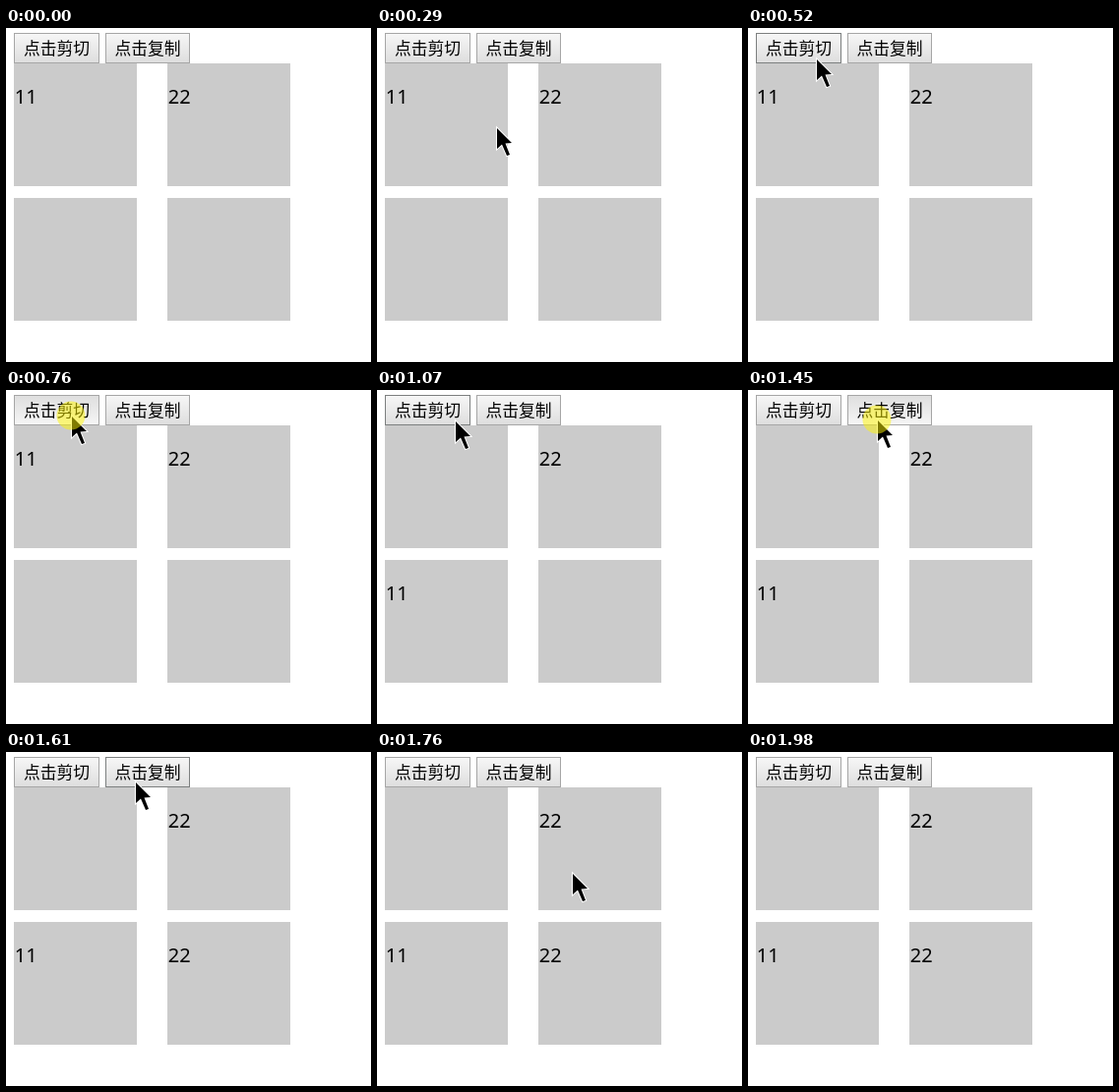
Recreate the animation shown at these times as an HTML page with a canvas. Size 371x340 px, loop 2.3 s.

```html
<!DOCTYPE html>
<html lang="zh">
<head>
<meta charset="utf-8">
<style>
html, body { margin: 0; width: 100%; height: 100%; overflow: hidden; background: #fff; }
canvas { display: block; width: 371px; height: 340px; }
</style>
</head>
<body>
<canvas id="stage"></canvas>
<script>
const LOOP = 2300, STEP = 74;
const W = 371, H = 340;
const ENTER = 68, CUT = 840, COPY = 1610, PRESS = 160;

const canvas = document.getElementById('stage');
const ctx = canvas.getContext('2d', { alpha: false });
const dpr = window.devicePixelRatio || 1;
canvas.width = W * dpr;
canvas.height = H * dpr;
ctx.scale(dpr, dpr);

const linear = p => p;
const easeIn = p => p ** 1.6;
const easeOut = p => 1 - (1 - p) ** 2;

// Each move starts where the previous one ended.
const origin = { x: 303, y: 315 };
const moves = [
  { at: ENTER, steps: 3, x: 121, y: 100, ease: linear },
  { at: 290, steps: 4, x: 66, y: 25, ease: easeOut },
  { at: 996, steps: 1, x: 79, y: 30, ease: linear },
  { at: 1070, steps: 3, x: 117, y: 31, ease: linear },
  { at: 1292, steps: 2, x: 131, y: 29, ease: easeOut },
  { at: COPY, steps: 5, x: 421, y: 434, ease: easeIn }
];

const buttons = [
  { x: 8, w: 87, label: '点击剪切' },
  { x: 101, w: 86, label: '点击复制' }
];
const BTN_Y = 5, BTN_H = 31;
const arrow = [[1, 2], [1, 23], [6, 18.5], [11, 30], [14, 29], [9.5, 17.5], [16, 17]];

// The pointer is sampled in steps, like a screen recorder does.
function pointerAt(t) {
  if (t < ENTER) return null;
  let { x, y } = origin;
  for (const m of moves) {
    if (t < m.at) break;
    const k = m.ease(Math.min(1, Math.floor((t - m.at) / STEP) / m.steps));
    x += (m.x - x) * k;
    y += (m.y - y) * k;
  }
  return { x: Math.round(x), y: Math.round(y) };
}

function drawButton({ x, w, label }, hover, pressed) {
  const fill = ctx.createLinearGradient(0, BTN_Y, 0, BTN_Y + BTN_H);
  fill.addColorStop(0, pressed ? '#dedede' : '#f7f7f7');
  fill.addColorStop(1, pressed ? '#f6f6f6' : '#dddddd');
  ctx.fillStyle = fill;
  ctx.fillRect(x, BTN_Y, w, BTN_H);
  ctx.strokeStyle = hover && !pressed ? '#7c7f7f' : '#a6a6a6';
  ctx.lineWidth = 1;
  ctx.strokeRect(x + 0.5, BTN_Y + 0.5, w - 1, BTN_H - 1);
  ctx.fillStyle = '#000';
  ctx.font = '16.8px "Noto Sans CJK SC", "Noto Sans CJK", sans-serif';
  ctx.textAlign = 'center';
  ctx.fillText(label, x + w / 2, 27);
}

function drawBox(x, y, text) {
  ctx.fillStyle = '#cbcbcb';
  ctx.fillRect(x, y, 125, 125);
  ctx.fillStyle = '#000';
  ctx.font = '20px "Noto Sans", sans-serif';
  ctx.textAlign = 'left';
  ctx.fillText(text, x + 0.7, y + 41);
}

function drawGlow({ x, y }) {
  ctx.fillStyle = 'rgba(255, 245, 0, 0.5)';
  ctx.beginPath();
  ctx.arc(x, y + 1, 14.5, 0, Math.PI * 2);
  ctx.fill();
}

function drawArrow({ x, y }) {
  ctx.save();
  ctx.translate(x, y);
  ctx.beginPath();
  for (const p of arrow) ctx.lineTo(...p);
  ctx.closePath();
  ctx.lineWidth = 2;
  ctx.strokeStyle = '#fff';
  ctx.stroke();
  ctx.fillStyle = '#000';
  ctx.fill();
  ctx.restore();
}

function draw(t) {
  const pos = pointerAt(t);
  const pressing = [CUT, COPY].some(end => t >= end - PRESS && t < end);
  ctx.fillStyle = '#fff';
  ctx.fillRect(0, 0, W, H);

  drawBox(8, 36, t < CUT ? '11' : '');
  drawBox(164, 36, '22');
  drawBox(8, 173, t < CUT ? '' : '11');
  drawBox(164, 173, t < COPY ? '' : '22');

  for (const b of buttons) {
    const hover = pos !== null && pos.x >= b.x && pos.x < b.x + b.w &&
      pos.y >= BTN_Y && pos.y < BTN_Y + BTN_H;
    drawButton(b, hover, hover && pressing);
  }
  if (pos) drawArrow(pos);
  if (pos && pressing) drawGlow(pos);
}

const start = performance.now();
function tick() {
  draw((performance.now() - start) % LOOP);
  requestAnimationFrame(tick);
}
tick();
</script>
</body>
</html>
```
